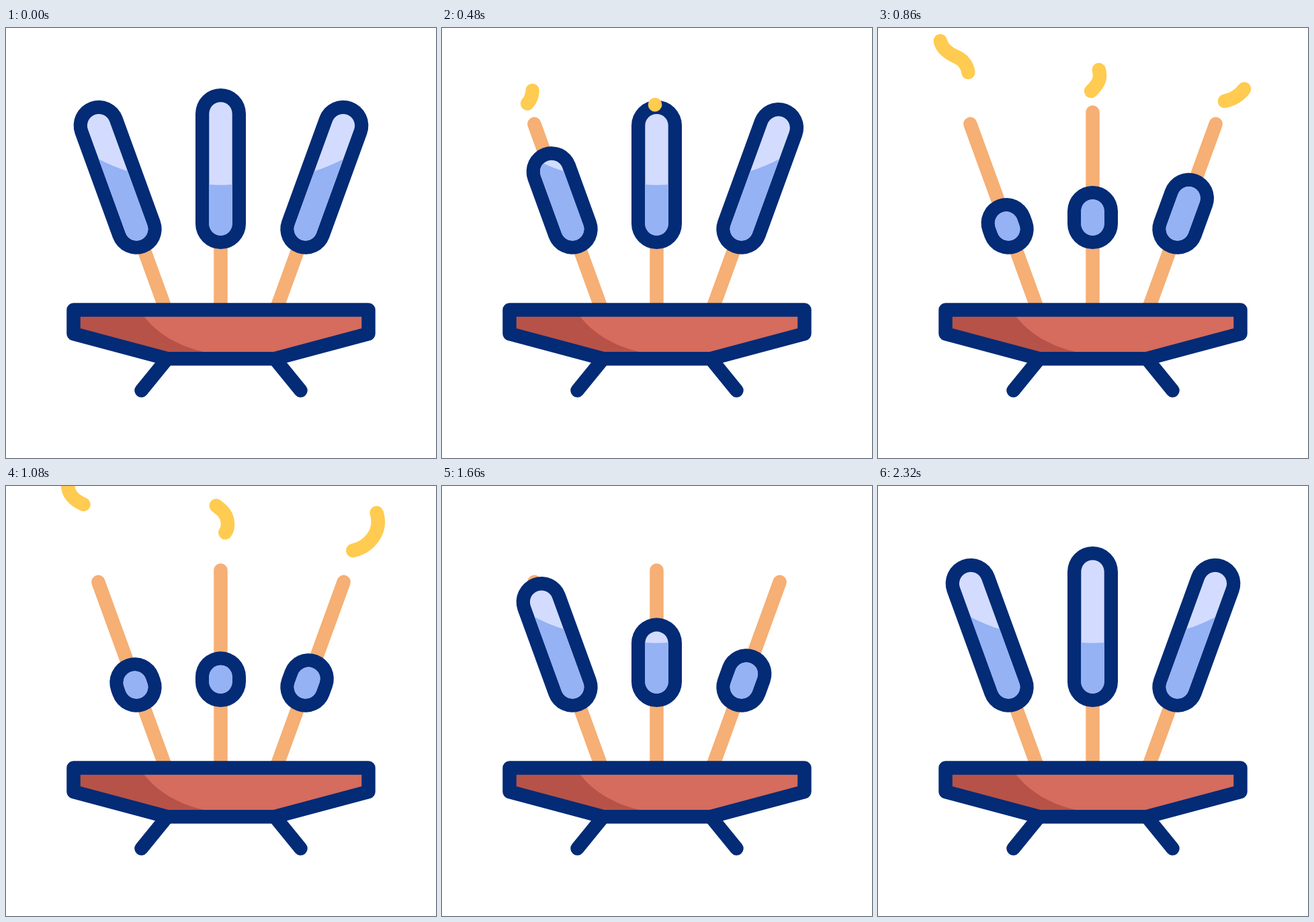
Animation, 640 px wide and 640 px high, one loop 2400 ms. Source, as an HTML page with a canvas:

```html
<!DOCTYPE html>
<html lang="en">
<head>
<meta charset="utf-8">
<style>
  html, body { margin: 0; height: 100%; overflow: hidden; background: #fff; }
  canvas { display: block; width: 640px; height: 640px; }
</style>
</head>
<body>
<canvas width="640" height="640"></canvas>
<script>
const ctx = document.querySelector('canvas').getContext('2d');
const LOOP = 2400, LINE = 20.5;
const NAVY = '#032b76', WOOD = '#f6af74', LIGHT = '#d3dcfe', BLUE = '#94b2f4';
const RED = '#d56c5d', DARK_RED = '#b75248', YELLOW = '#ffcb50';
const LEAN = 20 * Math.PI / 180;

// base: lower capsule centre; edge: fill line from left to right, above the base
const skewers = [
  { base: [194.2, 299.3], angle: -LEAN, flip: 1, edge: [118, 98, 85], tip: 188, foot: -128 },
  { base: [319.5, 291.5], angle: 0, flip: 1, edge: [58.5, 57, 58.5], tip: 166, foot: -128 },
  { base: [445.8, 299.3], angle: LEAN, flip: -1, edge: [118, 98, 85], tip: 188, foot: -128 }
];
skewers[0].tip = skewers[2].tip = 166.5;

const wisps = [
  { path: new Path2D('M127 120C133 113 135 106 134.5 98C133.5 82 124 76 116 72C98 64 92 54 92 42C92 30 97 15 104 8L104 -80'),
    rise: 330, start: 365, head: a => .185 * a, tail: t => .145 * (t - 680) },
  { path: new Path2D('M317 114.5C324 108 330 101 330 92C330 75 320 69 309 61C291 52 285 41 285 29C285 17 290 4 297 -3'),
    rise: 475, start: 475, head: a => .031 * a ** 1.185, tail: t => .00043 * Math.max(0, t - 900) ** 2 },
  { path: new Path2D('M516 120C540 115 560 92 552 65C549 58 551 50 558 42'),
    rise: 640, start: 670, head: a => .183 * a, tail: t => .25 * (t - 1080) }
];

const bowl = new Path2D('M100.5 419.5H539.5V455L400 492.25H240L100.5 455Z');
const bowlShade = new Path2D('M100.5 419.5H199L206 430C225 455 258 474 294 482V492H240L100.5 455Z');
const legs = new Path2D('M240 492.25L201.5 539.5M400 492.25L438.5 539.5');

function ease(x, x1, x2) {
  if (x <= 0) return 0;
  if (x >= 1) return 1;
  let lo = 0, hi = 1;
  for (let i = 0; i < 24; i++) {
    const s = (lo + hi) / 2, r = 1 - s;
    if (3 * r * r * s * x1 + 3 * r * s * s * x2 + s ** 3 < x) lo = s; else hi = s;
  }
  return lo * lo * (3 - 2 * lo);
}

function stroke(path, color, width = LINE) {
  ctx.strokeStyle = color;
  ctx.lineWidth = width;
  ctx.stroke(path);
}

function fill(path, color) {
  ctx.fillStyle = color;
  ctx.fill(path);
}

function axis(from, to) {
  const p = new Path2D();
  p.moveTo(0, -from);
  p.lineTo(0, -to);
  return p;
}

function drawSkewer({ base, angle, flip, edge, tip, foot }, i, t) {
  const down = ease((t - 10 - 151 * i) / 1005, .735, .203);
  const up = ease((t - 1051 - 151 * i) / 968, .788, .276);
  const length = 164 - 157 * (down - up);
  ctx.save();
  ctx.translate(...base);
  ctx.rotate(angle);
  ctx.scale(flip, 1);
  stroke(axis(foot, tip), WOOD);
  stroke(axis(0, length), NAVY, 75);
  const inner = new Path2D();
  inner.roundRect(-17.2, -length - 17.2, 34.4, length + 34.4, 17.2);
  fill(inner, LIGHT);
  ctx.clip(inner);
  const [left, middle, right] = edge;
  fill(new Path2D(`M-18 ${-left}Q0 ${-middle} 18 ${-right}V20H-18Z`), BLUE);
  ctx.restore();
}

function drawWisp({ path, rise, start, head, tail }, t) {
  if (t < start) return;
  const end = head(t - start), begin = Math.max(0, tail(t));
  if (end < begin) return;
  const age = t - rise;
  ctx.save();
  ctx.translate(0, -.047 * age - .000016 * age * age);
  ctx.setLineDash([Math.max(.1, end - begin), 2000]);
  ctx.lineDashOffset = -begin;
  stroke(path, YELLOW);
  ctx.restore();
}

function draw() {
  const t = performance.now() % LOOP;
  ctx.fillStyle = '#fff';
  ctx.fillRect(0, 0, 640, 640);
  ctx.lineCap = ctx.lineJoin = 'round';
  skewers.forEach((s, i) => drawSkewer(s, i, t));
  fill(bowl, RED);
  fill(bowlShade, DARK_RED);
  stroke(legs, NAVY);
  stroke(bowl, NAVY);
  if (t < 1620) wisps.forEach(w => drawWisp(w, t));
  requestAnimationFrame(draw);
}
draw();
</script>
</body>
</html>
```
